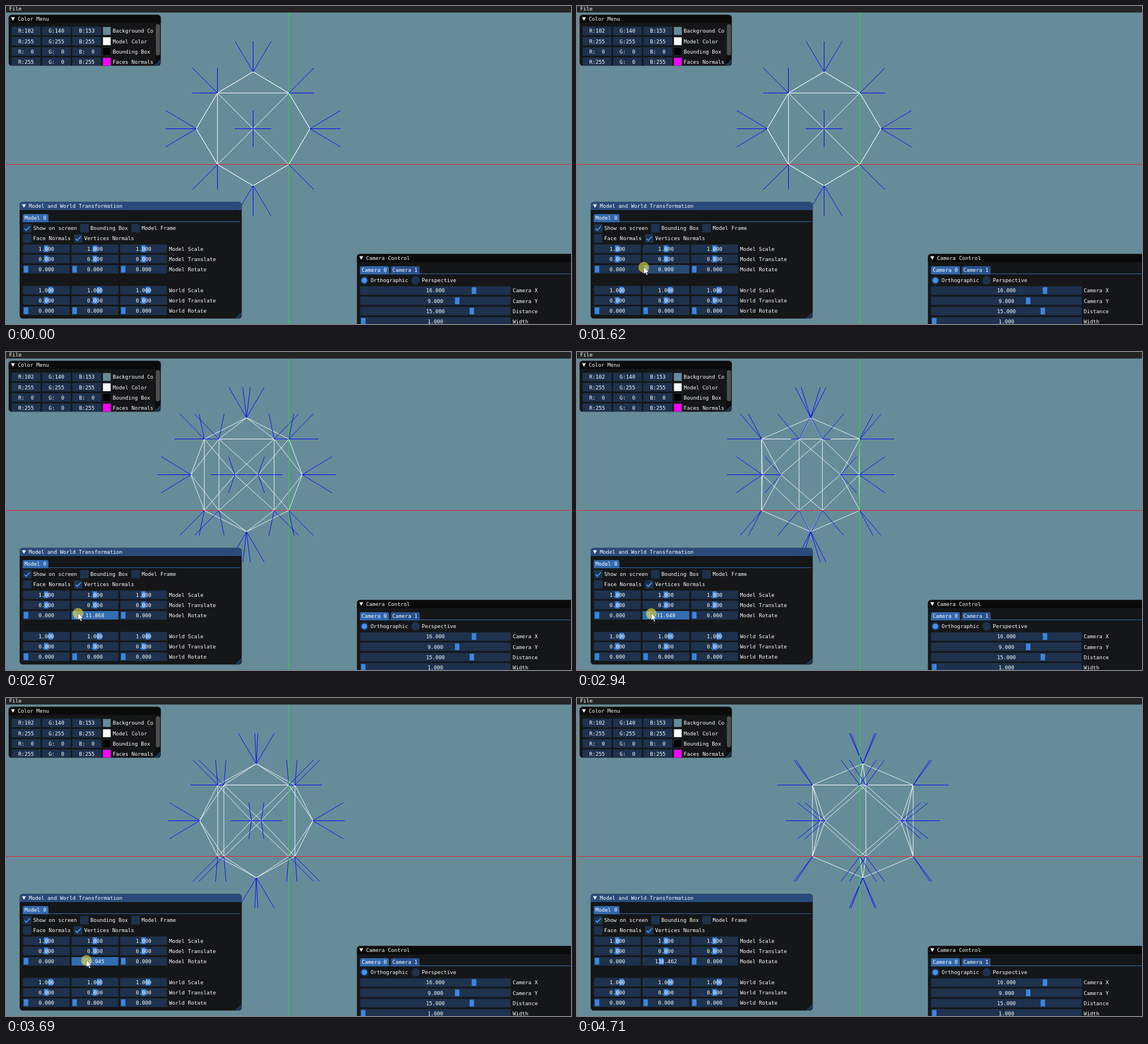
An HTML page with a canvas that plays this animation: 998x561 px, repeating every 5320 ms.

```html
<!DOCTYPE html>
<html lang="en">
<head>
<meta charset="utf-8">
<title>Mesh viewer</title>
<style>
html, body { margin: 0; height: 100%; overflow: hidden; background: #668c99; }
canvas { display: block; }
</style>
</head>
<body>
<canvas id="stage" width="998" height="561"></canvas>
<script>
const ctx = document.getElementById('stage').getContext('2d');
const LOOP = 5320, STEP = 67.3;
const FRAME = '#1e324d', GRAB = '#3d85e0', ACCENT = '#4296fa', TAB = '#3369ad';
const HOVERED = '#274a72', ACTIVE = '#336cb0';

// Pointer track: time, x, y, slider notch (0 to 91 is a full turn)
const TRACK = [
  [130, 898, 552, 0], [260, 690, 470, 0], [400, 445, 412, 0], [530, 270, 398, 0],
  [660, 190, 409, 0], [870, 145, 448, 0], [1070, 121, 458, 0], [1210, 118, 460, 0],
  [1820, 118, 460, 0], [2020, 119, 460, 0], [2470, 124, 460, 0], [2670, 127, 460, 3],
  [3220, 135, 461, 13], [3760, 143, 462, 26], [4040, 148, 462, 30],
  [4300, 152, 463, 33], [4370, 152, 464, 34], [4440, 151, 518, 35]
];

function sample(t) {
  const next = TRACK.findIndex(key => key[0] > t);
  if (next < 0) return TRACK[TRACK.length - 1];
  if (next === 0) return TRACK[0];
  const a = TRACK[next - 1], b = TRACK[next];
  const k = (t - a[0]) / (b[0] - a[0]);
  return a.map((v, i) => v + (b[i] - v) * k);
}

// Cube with a pyramid on every face, one cube corner at the world origin
const ORIGIN = [499.5, 279.5], HALF = 63, APEX = 100.5, NORMAL = 62.6;
const edges = [], normals = [];

function buildMesh() {
  const slope = Math.hypot(HALF, APEX - HALF);
  const up = NORMAL * HALF / slope, side = NORMAL * (APEX - HALF) / slope;
  const diagonal = NORMAL / Math.SQRT2;
  const corners = [];
  for (let i = 0; i < 8; i++) corners.push([0, 1, 2].map(b => i >> b & 1 ? HALF : -HALF));
  corners.forEach((c, i) => {
    for (let axis = 0; axis < 3; axis++) {
      if (!(i >> axis & 1)) edges.push([c, corners[i | 1 << axis]]);
      normals.push([c, c.map((v, a) => a === axis ? v : v + Math.sign(v) * diagonal)]);
    }
  });
  for (let axis = 0; axis < 3; axis++) for (const s of [-1, 1]) {
    const tip = [0, 0, 0];
    tip[axis] = s * APEX;
    corners.filter(c => c[axis] * s > 0).forEach(c => edges.push([tip, c]));
    for (const other of [1, 2]) for (const d of [-1, 1]) {
      const end = tip.slice();
      end[axis] += s * up;
      end[(axis + other) % 3] += d * side;
      normals.push([tip, end]);
    }
  }
}

function rect(x, y, w, h, color, radius = 0) {
  ctx.fillStyle = color;
  ctx.beginPath();
  ctx.roundRect(x, y, w, h, radius);
  ctx.fill();
}

function poly(points, color) {
  ctx.fillStyle = color;
  ctx.beginPath();
  points.forEach(([x, y]) => ctx.lineTo(x, y));
  ctx.closePath();
  ctx.fill();
}

function disc(x, y, r, color) {
  ctx.fillStyle = color;
  ctx.beginPath();
  ctx.arc(x, y, r, 0, Math.PI * 2);
  ctx.fill();
}

function text(str, x, mid, align = 'left') {
  ctx.fillStyle = '#fff';
  ctx.textAlign = align;
  ctx.fillText(str, x, mid + 3.4);
}

function line([x0, y0], [x1, y1], color) {
  ctx.strokeStyle = color;
  ctx.lineWidth = 0.9;
  ctx.beginPath();
  ctx.moveTo(x0, y0);
  ctx.lineTo(x1, y1);
  ctx.stroke();
}

function drawScene(angle) {
  const [ox, oy] = ORIGIN, cos = Math.cos(angle), sin = Math.sin(angle);
  const project = ([x, y, z]) => [ox + (x - HALF) * cos + (z - HALF) * sin, oy - HALF - y];
  rect(0, 0, 998, 561, '#668c99');
  edges.forEach(([a, b]) => line(project(a), project(b), '#fff'));
  normals.forEach(([a, b]) => line(project(a), project(b), '#00f'));
  rect(499, 0, 1, 561, '#18e030');
  rect(0, 279, 998, 1, '#e02830');
}

function panel(x, y, w, h, title, color) {
  rect(x, y, w, h, 'rgba(15,15,15,.94)', 5.5);
  rect(x, y, w, 14.6, color, [5.5, 5.5, 0, 0]);
  ctx.strokeStyle = 'rgba(110,110,128,.4)';
  ctx.lineWidth = 0.8;
  ctx.beginPath();
  ctx.roundRect(x, y, w, h, 5.5);
  ctx.stroke();
  poly([[x + 4.3, y + 4.2], [x + 11.2, y + 4.2], [x + 7.75, y + 10.4]], '#fff');
  text(title, x + 16.2, y + 7.2);
}

function grip(x, y) {
  poly([[x - 12, y - 0.5], [x - 0.5, y - 12], [x - 0.5, y - 5], [x - 5, y - 0.5]], '#1c3654');
}

function tab(label, x, y, w, color) {
  rect(x, y - 7, w, 14.5, color, [3, 3, 0, 0]);
  text(label, x + 3, y);
}

function slider(x, mid, w, value, offset, color = FRAME, grab = GRAB) {
  rect(x, mid - 7.5, w, 15, color);
  rect(x + offset, mid - 5.9, 7.9, 11.8, grab);
  text(value, x + w / 2, mid, 'center');
}

function checkbox(label, x, mid, checked) {
  rect(x, mid - 7.5, 15, 15, FRAME);
  if (checked) {
    ctx.strokeStyle = ACCENT;
    ctx.lineWidth = 1.8;
    ctx.beginPath();
    ctx.moveTo(x + 2.8, mid + 0.3);
    ctx.lineTo(x + 5.8, mid + 3.6);
    ctx.lineTo(x + 12.2, mid - 3.4);
    ctx.stroke();
  }
  text(label, x + 18, mid);
}

function radio(label, x, mid, on) {
  disc(x, mid, 7.5, FRAME);
  if (on) disc(x, mid, 4.8, ACCENT);
  text(label, x + 11, mid);
}

function drawColorMenu() {
  panel(4.5, 15.5, 269, 90, 'Color Menu', '#0a0a0a');
  rect(263, 31, 10, 74, 'rgba(5,5,5,.53)', [0, 0, 5, 0]);
  rect(264.5, 32, 7.5, 55, '#4f4f4f', 3.7);
  grip(273.5, 105.5);
  ctx.save();
  ctx.beginPath();
  ctx.rect(5, 31, 257, 74);
  ctx.clip();
  [
    ['Background Co', 102, 140, 153], ['Model Color', 255, 255, 255],
    ['Bounding Box', 0, 0, 0], ['Faces Normals', 255, 0, 255]
  ].forEach(([label, ...rgb], row) => {
    const mid = 44 + row * 18.1;
    rgb.forEach((v, i) => {
      const x = 10 + i * 53.6;
      rect(x, mid - 7.5, 51, 15, FRAME);
      text('RGB'[i] + ':' + String(v).padStart(3), x + 25.5, mid, 'center');
    });
    rect(170.8, mid - 7.4, 14.6, 14.8, '#3a3e42');
    rect(171.4, mid - 6.8, 13.4, 13.6, `rgb(${rgb})`);
    text(label, 188.5, mid);
  });
  ctx.restore();
}

function drawTransforms(notch, rotateColor) {
  panel(24, 345.5, 392.5, 206, 'Model and World Transformation', '#294a7a');
  tab('Model 0', 29.5, 374, 45.5, TAB);
  rect(29.5, 380, 384.5, 1, TAB);
  checkbox('Show on screen', 30, 392, true);
  checkbox('Bounding Box', 131, 392, false);
  checkbox('Model Frame', 221.5, 392, false);
  checkbox('Face Normals', 30, 410, false);
  checkbox('Vertices Normals', 120, 410, true);
  [
    ['Model Scale', 428.2, '1.000', 37.3], ['Model Translate', 446.3, '0.000', 37.3],
    ['Model Rotate', 464.4, '0.000', 1.6], ['World Scale', 501.3, '1.000', 45],
    ['World Translate', 519.4, '0.000', 37.3], ['World Rotate', 537.5, '0.000', 1.6]
  ].forEach(([label, mid, value, offset], row) => {
    for (let i = 0; i < 3; i++) {
      const x = 29.8 + i * 85.9;
      if (row === 2 && i === 1) {
        slider(x, mid, 82.8, (notch * 360 / 91).toFixed(3), 1.6 + notch * 0.789,
          rotateColor, rotateColor === ACTIVE ? ACCENT : GRAB);
      } else {
        slider(x, mid, 82.8, value, offset);
      }
    }
    text(label, 288, mid);
  });
  grip(416.5, 551.5);
}

function drawCamera() {
  panel(619.8, 437.3, 400, 150, 'Camera Control', '#0a0a0a');
  tab('Camera 0', 625.3, 466, 51, TAB);
  tab('Camera 1', 679.6, 466, 51, '#29508a');
  rect(625, 472, 373, 1, TAB);
  radio('Orthographic', 633, 484, true);
  radio('Perspective', 723.5, 484, false);
  [
    ['Camera X', '16.000', 197.2], ['Camera Y', '9.000', 167.5],
    ['Distance', '15.000', 193.4], ['Width', '1.000', 1.6]
  ].forEach(([label, value, offset], row) => {
    const mid = 502 + row * 18.1;
    slider(625.5, mid, 266, value, offset);
    text(label, 895, mid);
  });
}

function drawPointer(x, y) {
  const shape = [[0, 0], [0, 13], [3, 10.3], [5, 15], [7, 14.2], [5, 9.7], [9, 9.7]];
  poly(shape.map(([dx, dy]) => [x + dx, y + dy]), '#fff');
  ctx.strokeStyle = 'rgba(0,0,0,.75)';
  ctx.lineWidth = 0.6;
  ctx.stroke();
}

function draw() {
  const t = performance.now() % LOOP;
  const snapped = 130 + Math.floor((t - 130) / STEP + 0.3) * STEP;
  const [, x, y, rawNotch] = sample(snapped);
  const notch = t < 130 ? 0 : Math.round(rawNotch);
  const rotateColor = t >= 1880 && t < 4710 ? ACTIVE
    : t >= 1140 && t < 1880 ? HOVERED : FRAME;

  ctx.font = '9.19px "DejaVu Sans Mono", monospace';
  drawScene(notch / 91 * Math.PI * 2);
  rect(0, 0, 998, 11.5, '#242424');
  text('File', 5.5, 5);
  drawColorMenu();
  drawTransforms(notch, rotateColor);
  drawCamera();
  if (t >= 1620 && t < 4370) disc(x, y + 1, 9.5, 'rgba(215,205,60,.68)');
  if (t >= 130 && t < 4510) drawPointer(x, y);
  requestAnimationFrame(draw);
}

buildMesh();
draw();
</script>
</body>
</html>
```
